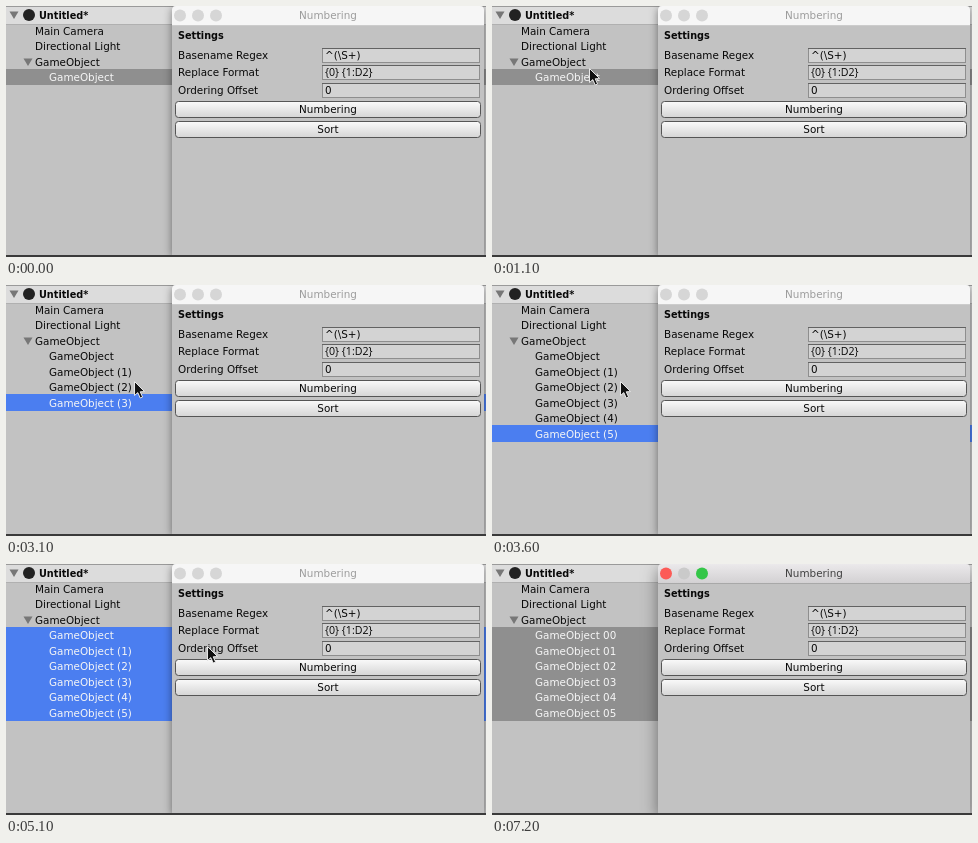
An HTML page with a canvas for the animation above (7400 ms loop, 480x251 px).

```html
<!DOCTYPE html>
<html lang="en">
<head>
<meta charset="utf-8">
<title>Numbering</title>
<style>
html, body { margin: 0; width: 100%; height: 100%; overflow: hidden; background: #c2c2c2; }
canvas { display: block; }
</style>
</head>
<body>
<canvas id="stage" width="480" height="251"></canvas>
<script>
const ctx = document.getElementById('stage').getContext('2d');
const LOOP = 7400, STEP = 100;
const INK = '#080808';
const PLAIN = '10.4px "DejaVu Sans", sans-serif';
const BOLD = 'bold 9.7px "DejaVu Sans", sans-serif';
const NARROW = '10.6px "Open Sans", sans-serif';

// Moments of the story, in ms
const FOCUS_TREE = 1200, SELECT_ALL = 4800, PRESS = 5800, RENAME = 5900;
const DUPLICATE = [2100, 2500, 2900, 3300, 3500];

// Pointer path: time, x, y
const PATH = [
  [300, 287, 256], [1000, 97, 62], [1200, 97, 62], [1800, 128, 96],
  [3700, 128, 96], [4400, 124, 70], [4800, 124, 70], [5100, 201, 82],
  [5500, 261, 99], [6900, 261, 99], [7200, 276, 254]
];

function pointerAt(t) {
  const i = PATH.findIndex(p => p[0] > t);
  if (i < 1) return null;
  const [t0, x0, y0] = PATH[i - 1], [t1, x1, y1] = PATH[i];
  const u = (t - t0) / (t1 - t0), e = u * u * (3 - 2 * u);
  return [x0 + (x1 - x0) * e, y0 + (y1 - y0) * e];
}

function rect(x, y, w, h, color) {
  ctx.fillStyle = color;
  ctx.fillRect(x, y, w, h);
}

function text(s, x, y, color = INK, font = PLAIN, align = 'left') {
  ctx.font = font;
  ctx.textAlign = align;
  ctx.fillStyle = color;
  ctx.fillText(s, x, y);
}

function outline(color) {
  ctx.lineWidth = 1;
  ctx.strokeStyle = color;
  ctx.stroke();
}

function circle(x, y, r, fill) {
  ctx.beginPath();
  ctx.arc(x, y, r, 0, 7);
  ctx.fillStyle = fill;
  ctx.fill();
}

function roundBox(x, y, w, h, radii, fill) {
  ctx.beginPath();
  ctx.roundRect(x, y, w, h, radii);
  ctx.fillStyle = fill;
  ctx.fill();
}

function polygon(points, x, y, fill) {
  ctx.beginPath();
  points.forEach(([dx, dy]) => ctx.lineTo(x + dx, y + dy));
  ctx.closePath();
  ctx.fillStyle = fill;
  ctx.fill();
}

function vertical(y0, y1, top, bottom) {
  const g = ctx.createLinearGradient(0, y0, 0, y1);
  g.addColorStop(0, top);
  g.addColorStop(1, bottom);
  return g;
}

const foldout = (x, y) => polygon([[-4.5, -3.5], [4.5, -3.5], [0, 4]], x, y, '#777');

function drawTree(t) {
  rect(0, 0, 480, 251, '#c2c2c2');
  rect(0, 0, 480, 18, '#dcdcdc');
  rect(0, 0, 480, 1, '#9a9a9a');
  rect(0, 18, 480, 1, '#b0b0b0');
  foldout(8, 9);
  circle(23, 9, 6, '#222');
  text('Untitled*', 33, 13, INK, BOLD);
  text('Main Camera', 29, 28.5);
  text('Directional Light', 29, 44);
  foldout(22, 56);
  text('GameObject', 29, 59.5);

  const last = DUPLICATE.filter(d => t >= d).length;
  const first = t >= SELECT_ALL ? 0 : last;
  const focused = t >= FOCUS_TREE && t < PRESS;
  const rowTop = i => 63 + 15.55 * i;
  const top = Math.floor(rowTop(first)), bottom = Math.ceil(rowTop(last + 1));
  rect(0, top, 480, bottom - top, focused ? '#4b7ef0' : '#8f8f8f');
  for (let i = 0; i <= last; i++) {
    const suffix = t >= RENAME ? ' 0' + i : i ? ` (${i})` : '';
    text('GameObject' + suffix, 43, rowTop(i) + 12, i >= first ? '#f6f6f6' : INK);
  }
}

function field(label, value, y, font) {
  text(label, 172, y + 11);
  rect(316, y, 158, 15, '#8e8e8e');
  rect(316, y, 158, 1, '#626262');
  rect(317, y + 1, 156, 13, '#d3d3d3');
  text(value, 319, y + 11, INK, font);
}

function button(label, y, pressed) {
  const shades = pressed ? ['#a6a6a6', '#bcbcbc'] : ['#fbfbfb', '#d4d4d4'];
  roundBox(169.5, y + 0.5, 305, 16, 3, vertical(y, y + 17, ...shades));
  outline('#555');
  text(label, 322, y + 12.3, INK, PLAIN, 'center');
}

function drawWindow(t) {
  const active = t >= PRESS;
  ctx.save();
  ctx.shadowColor = 'rgba(0,0,0,.45)';
  ctx.shadowBlur = active ? 16 : 8;
  ctx.shadowOffsetY = active ? 5 : 2;
  roundBox(166, 0, 312, 249, [4, 4, 0, 0], '#c2c2c2');
  ctx.restore();

  roundBox(166, 0, 312, 19, [4, 4, 0, 0],
    active ? vertical(0, 19, '#ebe9eb', '#d3d1d3') : '#f6f6f6');
  rect(166, 19, 312, 1, active ? '#a8a8a8' : '#cccccc');
  const lights = active ? ['#fc5b57', '#cacaca', '#34c648'] : Array(3).fill('#d6d6d6');
  lights.forEach((color, i) => circle(174 + 18 * i, 9.5, 6, color));
  text('Numbering', 322, 13, active ? '#404040' : '#9c9c9c', PLAIN, 'center');

  text('Settings', 172, 33, INK, BOLD);
  field('Basename Regex', '^(\\S+)', 42, PLAIN);
  field('Replace Format', '{0} {1:D2}', 59, NARROW);
  field('Ordering Offset', '0', 77, PLAIN);
  button('Numbering', 95, t >= PRESS && t < RENAME);
  button('Sort', 115, false);
  rect(0, 249, 480, 2, '#3a3a3a');
}

function drawPointer(t) {
  const p = pointerAt(t);
  if (!p) return;
  const arrow = [[0.5, 0.5], [0.5, 14.5], [3.8, 11.6], [6.2, 17], [8.6, 16], [6.2, 10.8], [10.6, 10.6]];
  polygon(arrow, ...p, '#111');
  outline('#e6e6e6');
}

function frame(now) {
  const t = Math.floor((now % LOOP) / STEP) * STEP;
  drawTree(t);
  drawWindow(t);
  drawPointer(t);
  requestAnimationFrame(frame);
}
requestAnimationFrame(frame);
</script>
</body>
</html>
```
